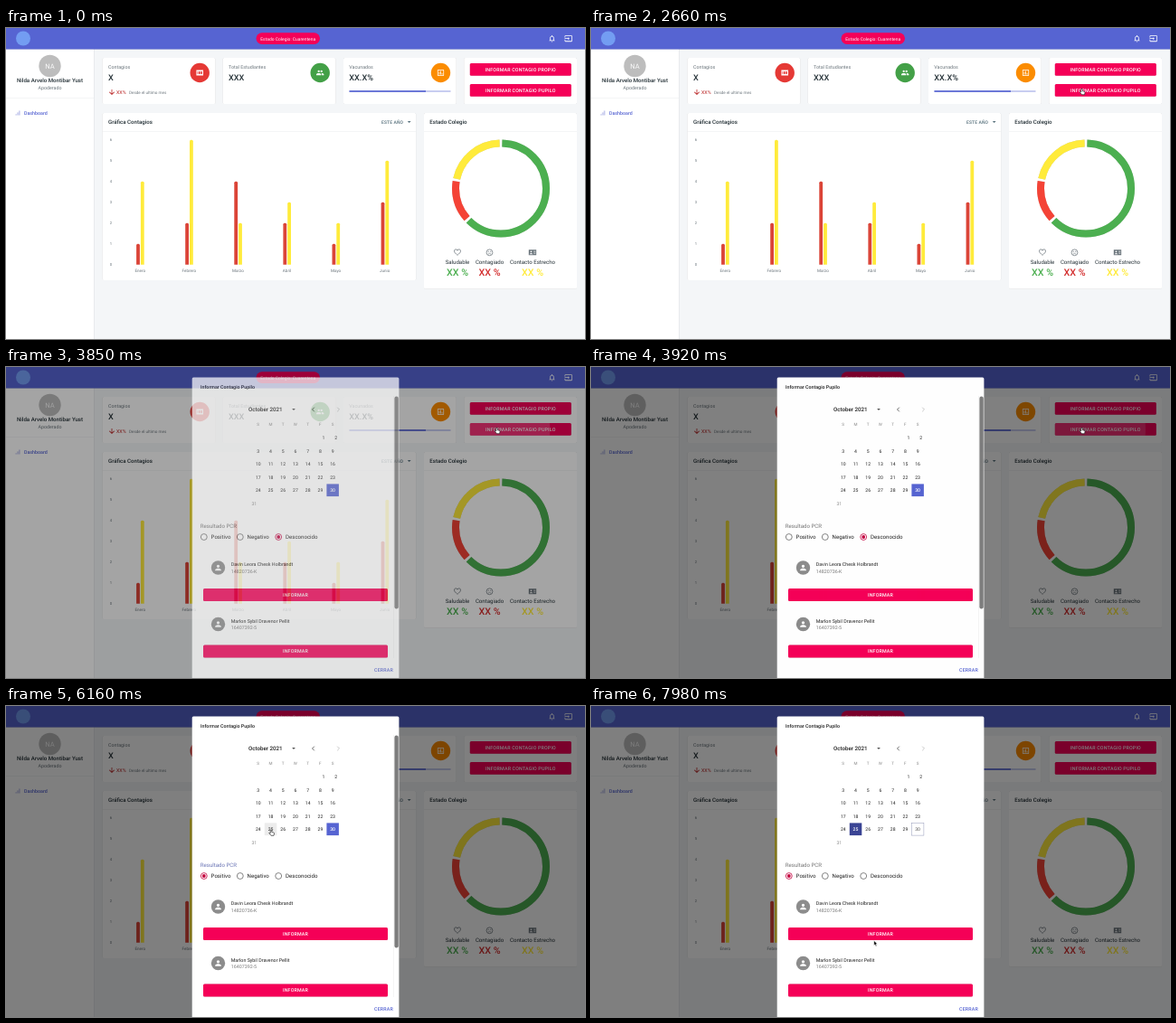
An HTML page for the animation above (8000 ms loop, 640 by 344 pixels).

```html
<!DOCTYPE html>
<html lang="es">
<head>
<meta charset="utf-8">
<title>Panel de contagios</title>
<style>
  html, body { margin: 0; width: 100%; height: 100%; overflow: hidden; background: #f4f6f8; }
  svg { display: block; width: 100%; height: 100%; }
  text { font-family: Roboto, sans-serif; text-rendering: geometricPrecision; }
  .card { filter: drop-shadow(0 .4px .7px rgba(0, 0, 0, .2)); }
</style>
</head>
<body>
<svg id="stage" viewBox="0 0 640 344"></svg>
<script>
const INDIGO = '#5664d2', PINK = '#f50057', RED = '#e53935', GREEN = '#4caf50', YELLOW = '#ffeb3b';
const INK = '#263238', GREY = '#6b757c';
const LOOP = 8000, STEP = 70;

// Drawing helpers, all returning SVG markup
const rect = (x, y, w, h, fill, more = '') =>
  `<rect x="${x}" y="${y}" width="${w}" height="${h}" fill="${fill}" ${more}/>`;
const circle = (x, y, r, fill, more = '') =>
  `<circle cx="${x}" cy="${y}" r="${r}" fill="${fill}" ${more}/>`;
const line = (d, color, width, more = '') =>
  `<path d="${d}" fill="none" stroke="${color}" stroke-width="${width}" ${more}/>`;
const text = (x, y, size, fill, label, { anchor = 'start', weight = 400, more = '' } = {}) =>
  `<text x="${x}" y="${y}" font-size="${size}" fill="${fill}" text-anchor="${anchor}" font-weight="${weight}" ${more}>${label}</text>`;
const mid = (x, y, size, fill, label, weight = 400, more = '') =>
  text(x, y, size, fill, label, { anchor: 'middle', weight, more });
const bold = (x, y, size, fill, label) => text(x, y, size, fill, label, { weight: 500 });
const card = (x, y, w, h) => rect(x, y, w, h, '#fff', 'rx="1.5" class="card"');
const icon = (x, y, content, color, size = 9.14) =>
  `<g transform="translate(${x - size / 2} ${y - size / 2}) scale(${size / 24})" fill="${color}">${content}</g>`;
const shape = d => `<path fill-rule="evenodd" d="${d}"/>`;
const button = (x, y, w, h, label) =>
  rect(x, y, w, h, PINK, 'rx="1.5" class="card"') +
  mid(x + w / 2, y + h / 2 + 1.9, 5.33, '#fff', label, 500, 'letter-spacing=".15"');
const caret = (x, y, color) => `<path d="M${x - 1.9} ${y - .9}h3.8l-1.9 1.9z" fill="${color}"/>`;

const ICONS = {
  bell: shape('M12 22c1.1 0 2-.9 2-2h-4c0 1.1.9 2 2 2zm6-6v-5c0-3.07-1.63-5.64-4.5-6.32V4c0-.83-.67-1.5-1.5-1.5s-1.5.67-1.5 1.5v.68C7.64 5.36 6 7.92 6 11v5l-2 2v1h16v-1l-2-2zm-2 1H8v-6c0-2.48 1.51-4.5 4-4.5s4 2.02 4 4.5v6z'),
  exit: shape('M21 3H3Q1 3 1 5v4h2V5h18v14H3v-4H1v4q0 2 2 2h18q2 0 2-2V5q0-2-2-2zM11 16l4-4-4-4v3H1v2h10z'),
  money: shape('M2 4h20v16H2zM5 8v8h2V8zM9 8v8h4V8zM15 8v8h4V8z'),
  people: shape('M16 11a3 3 0 1 0 0-6 3 3 0 0 0 0 6zM8 11a3 3 0 1 0 0-6 3 3 0 0 0 0 6zM8 13c-2.3 0-7 1.2-7 3.5V19h14v-2.5C15 14.200 10.300 13 8 13zM16 13l-1 .05c1.200.85 2 2 2 3.450V19h6v-2.500c0-2.300-4.700-3.500-7-3.500z'),
  chart: shape('M9 17H7v-7h2zM13 17h-2V7h2zM17 17h-2v-4h2zM19.500 19h-15V5h15zM19.500 3h-15q-2 0-2 2v14q0 2 2 2h15q2 0 2-2V5q0-2-2-2z'),
  down: shape('M20 12l-1.400-1.400L13 16.200V4h-2v12.200l-5.600-5.600L4 12l8 8z'),
  person: shape('M12 12a4 4 0 1 0 0-8 4 4 0 0 0 0 8zM12 14c-2.700 0-8 1.300-8 4v2h16v-2c0-2.700-5.300-4-8-4z'),
  heart: line('M12 20C6 14.600 3 12 3 8.500A4.500 4.500 0 0 1 12 6.500 4.500 4.500 0 0 1 21 8.500C21 12 18 14.600 12 20z', GREY, 2),
  sad: circle(12, 12, 9, 'none', `stroke="${GREY}" stroke-width="2"`) + circle(8.500, 9.500, 1.500, GREY) +
    circle(15.500, 9.500, 1.500, GREY) + line('M7.500 17q4.500-5 9 0', GREY, 1.700),
  contact: shape('M1 4h22v16H1zM15 8v2h6V8zM15 13v2h6v-2z') + circle(8, 9.500, 2.500, '#fff') +
    '<path d="M3 17q5-6 10 0z" fill="#fff"/>',
};

function header() {
  return rect(0, 0, 640, 23.500, INDIGO, 'class="card"') + circle(19, 11.500, 8, '#739df2') +
    rect(276.500, 5.300, 70.500, 12.600, PINK, 'rx="6.300"') +
    mid(311.700, 13.500, 4.950, '#fff', 'Estado Colegio: Cuarentena') +
    icon(603.500, 11.700, ICONS.bell, '#fff') + icon(621.700, 11.700, ICONS.exit, '#fff');
}

function sidebar() {
  return rect(0, 23, 97, 321, '#fff') + rect(97, 23, .5, 321, '#dcdfe2') +
    circle(48.500, 42, 12.200, '#bdbdbd') + mid(48.500, 44.700, 7.600, '#fafafa', 'NA') +
    mid(48.500, 60.200, 6.100, INK, 'Nilda Arvelo Montibar Yust', 500) +
    mid(48.500, 67.800, 5.330, GREY, 'Apoderado') + rect(0, 77.500, 97, .4, '#e3e5e7') +
    icon(13, 94, line('M6 20v-4M12 20V10M18 20V4', '#8e97dc', 2.500), 'none', 7.600) +
    bold(20, 95.900, 5.330, INDIGO, 'Dashboard');
}

function summaryCards() {
  const stats = [
    [106.700, 'Contagios', 'X', RED, 'money'],
    [239.700, 'Total Estudiantes', 'XXX', '#43a047', 'people'],
    [373, 'Vacunados', 'XX.X%', '#fb8c00', 'chart'],
  ];
  return stats.map(([x, label, value, color, name]) =>
    card(x, 33, 124.700, 51) + text(x + 6.300, 45, 5.330, GREY, label) + bold(x + 6.300, 58.200, 9.140, INK, value) +
    circle(x + 107.500, 49.500, 10.700, color) + icon(x + 107.500, 49.500, ICONS[name], '#fff')).join('') +
    icon(117, 71, ICONS.down, '#b71c1c') + text(122, 72.700, 5.330, '#b71c1c', 'XX%') +
    text(136, 72.500, 4.570, GREY, 'Desde el ultimo mes') +
    rect(379.500, 69.200, 112, 1.600, '#bbc1ed') + rect(379.500, 69.200, 84.500, 1.600, INDIGO) +
    card(506.300, 33, 124.700, 51) +
    button(512.800, 39, 112, 13.700, 'INFORMAR CONTAGIO PROPIO') +
    button(512.800, 62, 112, 13.700, 'INFORMAR CONTAGIO PUPILO');
}

function barChart() {
  const base = 261.700, unit = 23;
  const months = { Enero: [1, 4], Febrero: [2, 6], Marzo: [4, 2], Abril: [2, 3], Mayo: [1, 2], Junio: [3, 5] };
  const bar = (x, value, color) => {
    const h = value * unit;
    return `<path d="M${x} ${base}v${1.500 - h}q0-1.500 1.500-1.500h.8q1.500 0 1.500 1.500v${h - 1.500}z" fill="${color}"/>`;
  };
  const bars = Object.entries(months).map(([name, [red, yellow]], i) => {
    const x = 148.200 + i * 54.100;
    return bar(x - 4.100, red, '#db4437') + bar(x + .7, yellow, YELLOW) + mid(x, 270, 4.570, GREY, name);
  }).join('');
  const scale = [...Array(7).keys()].map(n => mid(116, base + 1.700 - n * unit, 4.200, GREY, n)).join('');
  return card(106.700, 94, 346.500, 185) + rect(106.700, 114, 346.500, .4, '#e3e5e7') +
    bold(113, 106.100, 6.100, INK, 'Gráfica Contagios') +
    text(415, 105.700, 4.950, '#546e7a', 'ESTE AÑO', { weight: 500, more: 'letter-spacing=".14"' }) +
    caret(445.700, 104, '#546e7a') + scale + bars;
}

function donut() {
  let start = 0;
  const ring = [[63, GREEN], [15, '#f44336'], [22, YELLOW]].map(([share, color]) => {
    const arc = `<circle cx="547" cy="177.500" r="50" fill="none" stroke="${color}" stroke-width="8" pathLength="100"
      stroke-dasharray="${share - .9} 100" stroke-dashoffset="${-start - .45}" transform="rotate(-90 547 177.500)"/>`;
    start += share;
    return arc;
  }).join('');
  const legend = [
    [499, 'Saludable', GREEN, 'heart'], [534.500, 'Contagiado', '#d32f2f', 'sad'], [582, 'Contacto Estrecho', YELLOW, 'contact'],
  ].map(([x, label, color, name]) => icon(x, 248.300, ICONS[name], GREY) +
    mid(x, 261.200, 6.100, INK, label) + mid(x, 274, 10.700, color, 'XX %', 500)).join('');
  return card(462, 94, 169, 194.500) + rect(462, 114, 169, .4, '#e3e5e7') +
    bold(468.300, 106.100, 6.100, INK, 'Estado Colegio') + `<g class="card">${ring}</g>` + legend;
}

const COLUMN = 13.720, ROW = 14.500;
function calendar() {
  const weekdays = [...'SMTWTFS'].map((d, i) => mid(278.700 + i * COLUMN, 64.900, 4.570, '#8a8a8a', d)).join('');
  const days = [...Array(31).keys()].map(i => {
    const cell = i + 5, row = Math.floor(cell / 7);
    const shift = row === 0 ? 3.500 : row === 5 ? -4.500 : 0;
    return mid(278.800 + (cell % 7) * COLUMN + shift, 80 + row * ROW, 5.100,
      row === 5 ? '#8a8a8a' : '#212121', i + 1, 400, `id="day${i + 1}"`);
  }).join('');
  return bold(268, 49.100, 6.200, '#212121', 'October 2021') + caret(318, 47, '#555') +
    line('M340.800 44.700l-2.300 2.300 2.300 2.300', '#444', .8) + line('M366.200 44.700l2.300 2.300-2.300 2.300', '#bbb', .8) +
    weekdays + rect(285.800, 129.400, 13.500, 13.700, 'none', 'id="box25"') +
    rect(354.400, 129.400, 13.500, 13.700, INDIGO, 'id="box30" stroke-width=".5"') + days;
}

function dialog() {
  const radio = (x, label, id) =>
    `<g id="${id}">${circle(x, 188, 3.450, 'none', 'stroke-width=".8"')}${circle(x, 188, 1.900, '#c4003f')}</g>` +
    text(x + 7.800, 190.200, 6.100, '#212121', label);
  const pupil = (y, name, number) =>
    circle(234.500, y, 7.700, '#8c8c8c') + icon(234.500, y, ICONS.person, '#fff', 10) +
    text(248.700, y - 1.700, 5.330, '#212121', name) + text(248.700, y + 5.500, 5.330, '#7a7a7a', number) +
    button(218, y + 23, 204, 13.900, 'INFORMAR');
  return rect(205.700, 11.500, 228.700, 345, '#fff', 'rx="1.500"') +
    bold(215, 23.700, 5.330, '#212121', 'Informar Contagio Pupilo') + calendar() +
    text(214.800, 178.100, 6.100, '#757575', 'Resultado PCR', { more: 'id="pcr"' }) +
    radio(218.800, 'Positivo', 'positive') + radio(258.800, 'Negativo', 'negative') + radio(301.200, 'Desconocido', 'unknown') +
    pupil(222, 'Davin Leora Chesk Holbrandt', '14820736-K') +
    pupil(284.500, 'Marlon Sybil Dravenor Pellit', '16407392-5') +
    text(407, 336.800, 5.330, INDIGO, 'CERRAR', { weight: 500, more: 'letter-spacing=".15"' }) +
    `<g id="scrollbar">${rect(428.400, 32, .4, 290, '#e6e6e6')}${rect(429.400, 32.500, 4.400, 235, '#7d7d7d', 'rx="2.200"')}</g>`;
}

const stage = document.getElementById('stage');
stage.innerHTML = `<clipPath id="pupilButton"><rect x="512.800" y="62" width="112" height="13.700" rx="1.500"/></clipPath>` +
  rect(0, 0, 640, 344, '#f4f6f8') + sidebar() + header() + summaryCards() + barChart() + donut() +
  `<g clip-path="url(#pupilButton)">${circle(543, 69, 0, '#fff', 'id="ripple"')}</g>` +
  rect(0, 0, 640, 344, '#000', 'id="backdrop"') + `<g id="dialog">${dialog()}</g>` +
  `<g id="cursor" stroke-linejoin="round">
    <path id="arrow" d="M0 0v5.200l1.200-1.100.9 2 .9-.4-.9-2h1.600z" stroke="#fff" stroke-width=".45"/>
    <path id="hand" d="M0 0q.7 0 .7.8v1.800l2 .5q.9.3.8 1.200l-.5 2.200h-3l-2.200-2.800q.2-.8 1.200-.2l.3.300V.8Q-.7 0 0 0z" fill="#fff" stroke="#111" stroke-width=".6"/>
  </g>`;

const $ = id => document.getElementById(id);
const set = (id, attributes) => {
  for (const [name, value] of Object.entries(attributes)) $(id).setAttribute(name, value);
};
const clamp = v => Math.min(1, Math.max(0, v));
const smooth = v => v * v * (3 - 2 * v);

// Pointer path: time, x, y, and whether it is a hand from then on
const PATH = [
  [1190, 383, 226, 0], [1330, 422, 158, 0], [1680, 500, 96, 0], [2030, 563, 48, 1], [2240, 542.500, 67.200, 1],
  [4270, 542.500, 67.200, 0], [4410, 404, 125, 0], [4550, 350, 149, 0], [4620, 350, 149, 0], [5390, 219, 187, 1],
  [5700, 219, 187, 0], [6090, 293, 136.800, 1], [7440, 293, 136.800, 0], [7930, 312.800, 259.600, 0],
];
function pointerAt(t) {
  const next = PATH.findIndex(p => p[0] > t);
  if (next < 0) return PATH[PATH.length - 1].slice(1);
  if (next === 0) return null;
  const [t0, x0, y0, hand] = PATH[next - 1], [t1, x1, y1] = PATH[next];
  const k = (t - t0) / (t1 - t0);
  return [x0 + (x1 - x0) * k, y0 + (y1 - y0) * k, hand];
}

function draw(t) {
  const open = smooth(clamp((t - 3705) / 225));
  set('backdrop', { opacity: open / 2 });
  set('dialog', { opacity: open });
  const grow = clamp((t - 3500) / 450);
  set('ripple', { r: 75 * grow, opacity: t < 3500 ? 0 : .2 * (1 - clamp((t - 3900) / 300)) });

  const answered = t >= 5600, dated = t >= 6790;
  const choice = answered ? 'positive' : 'unknown';
  for (const id of ['positive', 'negative', 'unknown']) {
    const [outer, dot] = $(id).children;
    outer.setAttribute('stroke', id === choice ? '#c4003f' : '#666');
    dot.setAttribute('opacity', id === choice ? 1 : 0);
  }
  set('pcr', { fill: answered && !dated ? '#6b75b5' : '#757575' });
  set('scrollbar', { opacity: t < 4340 || (answered && t < 6400) ? 1 : 0 });
  set('box25', { fill: dated ? '#3a4494' : t >= 6020 ? '#ececec' : 'none' });
  set('day25', { fill: dated ? '#fff' : '#212121', 'font-weight': dated ? 500 : 400 });
  set('box30', { fill: dated ? '#fff' : INDIGO, stroke: dated ? '#9298b8' : 'none' });
  set('day30', { fill: dated ? '#555' : '#fff', 'font-weight': dated ? 400 : 500 });

  const pointer = pointerAt(t);
  set('cursor', { opacity: pointer ? 1 : 0 });
  if (pointer) {
    const [x, y, hand] = pointer;
    set('cursor', { transform: `translate(${x} ${y})` });
    set('arrow', { opacity: hand ? 0 : 1 });
    set('hand', { opacity: hand ? 1 : 0 });
  }
}

function tick() {
  draw(Math.floor(performance.now() % LOOP / STEP) * STEP);
  requestAnimationFrame(tick);
}
tick();
</script>
</body>
</html>
```
